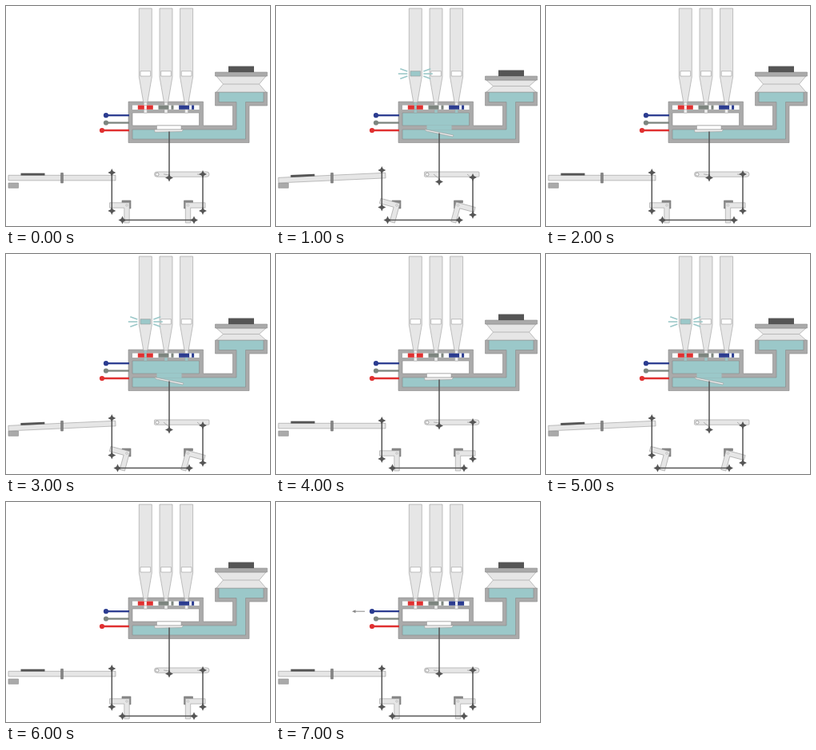
Animation of 330 by 276 pixels, one loop 8 s. Source, as an HTML page:

```html
<!DOCTYPE html>
<html>
<head>
<meta charset="utf-8">
<style>
  html, body { margin: 0; width: 100%; height: 100%; overflow: hidden; background: #fff; }
  svg { display: block; width: 330px; height: 276px; }
</style>
</head>
<body>
<svg id="stage" viewBox="0 0 330 276"></svg>
<script>
const AIR = '#9bc8c9', WALL = '#aaa', PALE = '#e6e6e6', EDGE = '#999', DARK = '#555';
const RED = '#e03030', GREY = '#7d857f', BLUE = '#2b3c90';

const path = (d, fill, stroke = 'none', width = .6) =>
  `<path d="${d}" fill="${fill}" stroke="${stroke}" stroke-width="${width}"/>`;
const rect = (x, y, w, h, fill, stroke, width) => path(`M${x},${y}h${w}v${h}h${-w}z`, fill, stroke, width);
const line = (x1, y1, x2, y2, color = DARK, width = 1.5) => path(`M${x1},${y1}L${x2},${y2}`, 'none', color, width);
const circle = (x, y, r, fill, stroke = 'none') =>
  `<circle cx="${x}" cy="${y}" r="${r}" fill="${fill}" stroke="${stroke}" stroke-width=".6"/>`;
const turn = (angle, x, y, content) => `<g transform="rotate(${angle} ${x} ${y})">${content}</g>`;
const nut = (x, y) =>
  path(`M${x},${y - 5}l1.5,3.2 3.5,1.8 -3.5,1.8 -1.5,3.2 -1.5,-3.2 -3.5,-1.8 3.5,-1.8z`, DARK);

function bellows(pressed) {
  const top = pressed ? 88 : 83, middle = (top + 113) / 2;
  return path(`M263,${top + 5}H325L316.5,${middle}L325,108H263L271.5,${middle}z`, PALE, EDGE) +
    line(271.5, middle, 316.5, middle, EDGE, .6) +
    rect(261.5, top, 65, 5, WALL, '#888') +
    rect(278, top - 7.5, 32, 7.5, DARK);
}

function windChest(pressed) {
  return path('M153,120H246.5V150H283.5V125H261.5V108H326.5V125H304V171.5H153z', WALL, '#888') +
    path('M158,155H288V120.5H266V108H322V120.5H299.5V167H158z', AIR, '#888') +
    rect(158, 124.5, 83.5, 5.5, '#fff') +
    rect(158, 134, 83.5, 16, pressed ? AIR : '#fff', '#888') +
    (pressed
      ? rect(188.5, 149.5, 31, 6, AIR) + path('M185,154.5L222,162L221,164L188,157z', '#eee', EDGE)
      : rect(188.5, 150, 30.5, 5, '#fff', EDGE) + path('M185.5,155H222L219.5,157.5L186,158.2z', '#eee', EDGE));
}

// Each stop has a slot that lines up with its pipe foot when drawn out.
function stop(x, y, color, out, pressed) {
  const knob = out ? 120 : 125, slot = x + (out ? 0 : 5);
  return rect(x - 9.5, 124.5, 19, 5.3, color) +
    rect(slot - 1.5, 124.5, 3, 5.3, out && pressed ? AIR : '#fff') +
    line(knob, y, 154, y, color, 2.3) + circle(knob, y, 3.1, color);
}

function pipe(x, sounding, pressed, open) {
  const foot = pressed ? AIR : '#f2f2f2';
  return path(`M${x - 8},3H${x + 8}V89L${x + 2.5},121H${x - 2.5}L${x - 8},89z`, PALE, EDGE) +
    rect(x - 6.3, 81.7, 12.6, 6.3, sounding ? AIR : '#fff', EDGE) +
    rect(x - 2, 121, 4, 3.5, open ? foot : '#f2f2f2', EDGE, .4) +
    rect(x - 2, 130, 4, 4, foot, EDGE, .4);
}

const rays = [-1, 1].map(side => [-1, 0, 1].map(k =>
  line(174.3 + side * 10, 85 + k * 3, 174.3 + side * (k ? 19 : 21.5), 85 + k * 6.3, AIR, 1.6)).join('')).join('');

function crank(x, side, angle) {
  const corner = path(`M${x + side * 5},254V244H${x - side * 6}V247H${x + side * 2}V254z`, '#888', '#777');
  const arm = path(`M${x + side * 3.2},246.8H${x - side * 21.5}V253.2H${x - side * 3.2}V272H${x + side * 3.2}z`, PALE, EDGE);
  return corner + turn(angle, x, 250, arm + circle(x, 250, 1.2, '#fff', EDGE));
}

function action(pressed) {
  const angle = pressed ? 15 : 0, left = pressed ? 206 : 209, slide = pressed ? -6 : 0;
  const sink = pressed ? 5 : 0;
  const key = rect(3, 212.3, 134, 6.6, PALE, EDGE) + rect(18.5, 209.7, 30, 2.9, DARK);
  return rect(3, 222, 12.5, 6.3, WALL, '#888') +
    turn(pressed ? -2.6 : 0, 70, 215.6, key) +
    rect(68.6, 209.5, 2.8, 12.5, '#888', '#666') +
    crank(151, 1, angle) + crank(227.5, -1, angle) +
    `<rect x="185.5" y="208" width="68.5" height="6.3" rx="${pressed ? 1 : 3}" fill="${PALE}" stroke="${EDGE}" stroke-width=".6"/>` +
    circle(189, 211.2, 2, '#fff', '#777') +
    [204, 246].map(x => line(x - 7, 211, x, 212 + sink, EDGE, .7)).join('') +
    line(204, 157.5 + (pressed ? 2 : 0), 204, 217 + sink) +
    line(132.3, left - 3, 132.3, pressed ? 252 : 256) +
    line(246, 208 + sink, 246, 257 + sink) +
    line(144 + slide, 268.6, 236 + slide, 268.6) +
    nut(132.3, left) + nut(132.3, pressed ? 252.5 : 257) +
    nut(204, 215.5 + sink) + nut(246, 211 + sink * .8) + nut(246, 257 + sink) +
    nut(145.5 + slide, 268.6) + nut(235 + slide, 268.6);
}

function scene(pressed, blueOut) {
  return windChest(pressed) + bellows(pressed) +
    stop(174.3, 156, RED, true, pressed) +
    stop(200, 146.5, GREY, false, pressed) +
    stop(225.6, 137.2, BLUE, blueOut, pressed) +
    pipe(174.3, pressed, pressed, true) +
    pipe(200, false, pressed, false) +
    pipe(225.6, false, pressed, blueOut) +
    (pressed ? rays : '') +
    (blueOut ? line(111, 137.2, 97, 137.2, '#888', 1) + path('M95,137.2l4.5,-2v4z', '#888') : '') +
    action(pressed);
}

const stage = document.getElementById('stage');
let shown = -1;
function frame(now) {
  const second = Math.floor(now / 1000) % 8;
  if (second !== shown) {
    shown = second;
    stage.innerHTML = scene([1, 3, 5].includes(second), second === 7);
  }
  requestAnimationFrame(frame);
}
frame(0);
</script>
</body>
</html>
```
